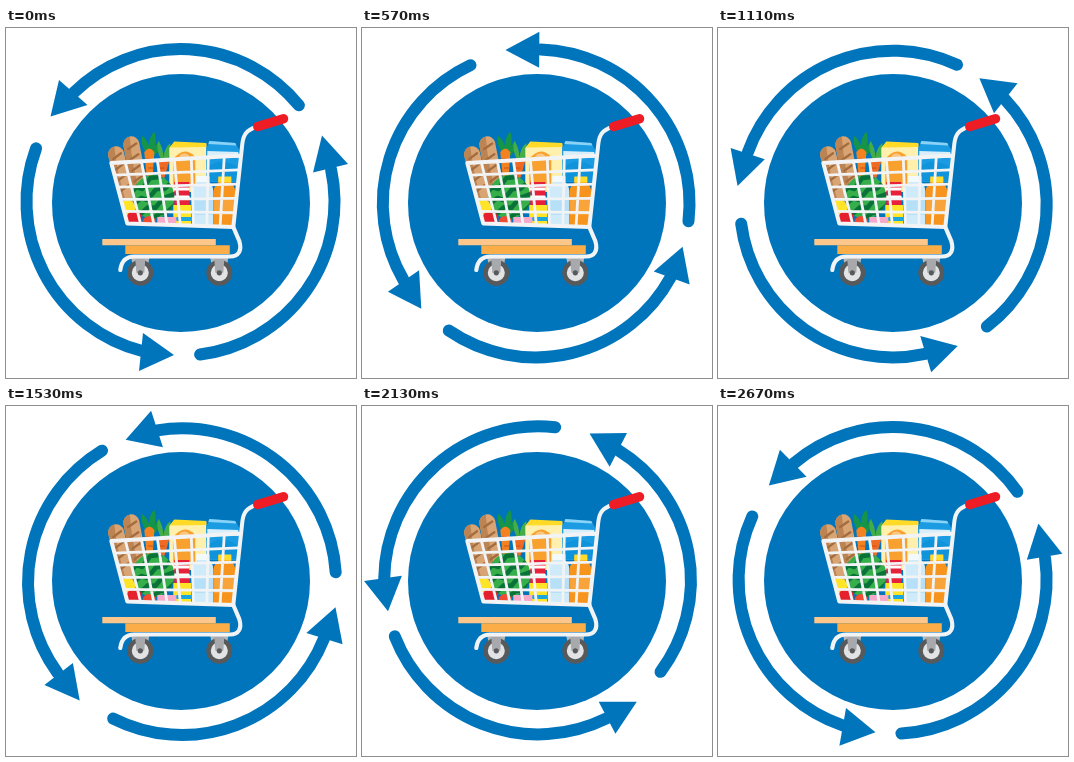
These frames come from a looping animation (350 px wide and 350 px high, 2.7 s). An HTML page:

```html
<!DOCTYPE html>
<html lang="en">
<head>
<meta charset="utf-8">
<title>Shopping cart cycle</title>
<style>
html, body { margin: 0; width: 100%; height: 100%; overflow: hidden; background: #fff; }
svg { display: block; width: 100vw; height: 100vh; }
</style>
</head>
<body>
<svg viewBox="0 0 350 350" fill="none" stroke-linecap="round" stroke-linejoin="round">
  <defs>
    <clipPath id="inside"><path d="M90 95H240L227 198L121 194L105 134L97 125Z"/></clipPath>
    <clipPath id="melon"><ellipse cx="147" cy="168" rx="21" ry="22"/></clipPath>
    <g id="loaf">
      <rect x="-8" y="0" width="16" height="66" rx="8" fill="#d9a473"/>
      <path d="M0 0A8 8 0 0 0 -8 8V58A8 8 0 0 0 0 66Q-4 33 0 0Z" fill="#bd8453"/>
      <path d="M-4 12L5 8M-4 23L5 19M-4 34L5 30M-4 45L5 41" stroke="#a46d40" stroke-width="2.400"/>
    </g>
    <g id="wheel">
      <path d="M-9 -15H9L6 2H-6Z" fill="#b5b8bb"/>
      <circle r="13" fill="#58595b"/>
      <circle r="8.500" fill="#e1e3e4"/>
      <path d="M-5 -14H5L4 0H-4Z" fill="#a7a9ac"/>
      <circle r="2.600" fill="#58595b"/>
    </g>
  </defs>

  <circle cx="175" cy="175" r="129" fill="#0075bc"/>
  <g id="ring" fill="#0075bc"></g>

  <g transform="translate(.3 1)">
    <g clip-path="url(#inside)">
      <use href="#loaf" transform="translate(108 117.500) rotate(-13)"/>
      <use href="#loaf" transform="translate(123.500 107.500) rotate(-11)"/>
      <path d="M143 126C136 121 134 112 136 107C141 111 144 117 144 126C141 114 144 106 148 103C151 110 149 119 145 126C148 117 151 113 154 112Q154 121 147 128Z" fill="#169447"/>
      <path d="M155 131Q149 120 152 112Q157 118 157 129Q158 119 164 114Q166 124 160 132Z" fill="#45ad48"/>
      <path d="M138 123Q143 116 148 123L146 154H141Z" fill="#f58220"/>
      <path d="M151 132Q158 126 163 132L156 156H151Z" fill="#ef6b23"/>
      <path d="M139 130H144M142 139H147M153 139H158" stroke="#c9531c" stroke-width="1"/>
      <path d="M163 119L168 113L200 115V163H163Z" fill="#fff0ad"/>
      <path d="M163.500 118.500L168 112.500L200 114V118Z" fill="#ffda27"/>
      <path d="M167 130Q178 116 189 128V158H167Z" fill="#f9a12e"/>
      <ellipse cx="178" cy="128" rx="5" ry="3.500" fill="#fbc681"/>
      <path d="M200 119L204 112L229 114L233 121V153H200Z" fill="#1b9ce2"/>
      <path d="M203 112L229 114L230 116.500L202 115Z" fill="#8bd3f6"/>
      <path d="M201 122L232 123V129L201 127Z" fill="#d8effb"/>
      <path d="M202 138Q215 127 231 138V152H202Z" fill="#0f93db"/>
      <path d="M168 153H183V181H168Z" fill="#e8213b"/>
      <path d="M168 160H182M168 168H182" stroke="#fff" stroke-width="3"/>
      <path d="M167 176H185V197H167Z" fill="#ffe428"/>
      <path d="M171 190H185" stroke="#1ba6de" stroke-width="4"/>
      <ellipse cx="147" cy="168" rx="21" ry="22" fill="#36ae4a"/>
      <g clip-path="url(#melon)" stroke="#087238" stroke-width="4.500">
        <path d="M123 166L130 158L136 160L144 149L154 148M125 177L135 169L141 171L150 160L158 160L168 151M132 187L142 178L149 179L157 169L171 164M144 191L154 184L160 184L170 175"/>
      </g>
      <circle cx="121" cy="179" r="8" fill="#ffe428"/>
      <circle cx="128" cy="190" r="8" fill="#e4202d"/>
      <circle cx="143" cy="194" r="7" fill="#f04c32"/>
      <path d="M151 188H170V198H151Z" fill="#f6a9c8"/>
      <path d="M191 148H203V153Q207 157 207 163V199H186V163Q186 157 191 153Z" fill="#cfeaf9"/>
      <path d="M190 147H203V153H190Z" fill="#f3fafe"/>
      <path d="M186 171H207V186H186Z" fill="#b5e0f7"/>
      <path d="M212 149H225V154Q229 158 229 164V199H207V164Q207 158 212 154Z" fill="#f7941e"/>
      <path d="M212 147.500H225V153.500H212Z" fill="#ffdc2b"/>
      <path d="M208 171H229V186H208Z" fill="#f9a43a"/>
    </g>

    <path d="M96 210H209.500V216.200H96Z" fill="#fdc68a"/>
    <path d="M119 216.200H223.500V225H119Z" fill="#fbad48"/>
    <use href="#wheel" x="134" y="243.800"/>
    <use href="#wheel" x="213" y="243.800"/>
    <g stroke="#f1f3f5">
      <path id="grid" stroke-width="2.800"/>
      <path d="M250 98C240 101 237 106 236 115L227 198L121 194.500L105 134L234 126.500" stroke-width="4"/>
      <path d="M227 198L233 212C236 222 232 227.500 224 227.500H128C119 227.500 115 233 114 241" stroke-width="4.200"/>
    </g>
    <path d="M251.500 97.500L277.200 89.700" stroke="#ee1c25" stroke-width="9.500"/>
  </g>
</svg>
<script>
const LOOP = 2700, STEP = 30;
const CX = 174.5, CY = 173.8;
const ring = document.getElementById('ring');

// radius, tail angle, neck angle, head corners
const arrows = [
  [152.7, -39.2, -134.3, '44.500 88.500L53 52L81.500 77'],
  [154, 200.3, 104.7, '168 327L137 305L133 343'],
  [154, 82.7, -12.1, '316 107.500L342 136L307 144.500']
];

function polar(r, deg) {
  const a = deg * Math.PI / 180;
  return (CX + r * Math.cos(a)).toFixed(2) + ' ' + (CY + r * Math.sin(a)).toFixed(2);
}

ring.innerHTML = arrows.map(([r, tail, neck, head]) =>
  `<path d="M${polar(r, tail)}A${r} ${r} 0 0 0 ${polar(r, neck)}" fill="none" stroke="#0075bc" stroke-width="12"/>
   <path d="M${head}Z"/>`).join('');

// basket wires
const mix = (a, b, k) => a + (b - a) * k;
let wires = '';
[119, 135, 151, 168, 185, 202, 218].forEach((x, i) => {
  const top = (x - 105) / 129, low = (i + 1) / 8;
  wires += `M${x} ${mix(134, 126.5, top)}L${mix(121, 227, low)} ${mix(194.5, 198, low)}`;
});
for (let i = 1; i < 5; i++) {
  const k = i / 5;
  wires += `M${mix(105, 121, k)} ${mix(134, 194.5, k)}L${mix(234, 227, k)} ${mix(126.5, 198, k)}`;
}
document.getElementById('grid').setAttribute('d', wires);

function draw(ms) {
  const t = Math.floor((ms % LOOP) / STEP) * STEP;
  ring.setAttribute('transform', `rotate(${-360 * t / LOOP} 175 175.2)`);
}

const start = performance.now();
function tick() {
  draw(performance.now() - start);
  requestAnimationFrame(tick);
}
draw(0);
requestAnimationFrame(tick);
</script>
</body>
</html>
```
